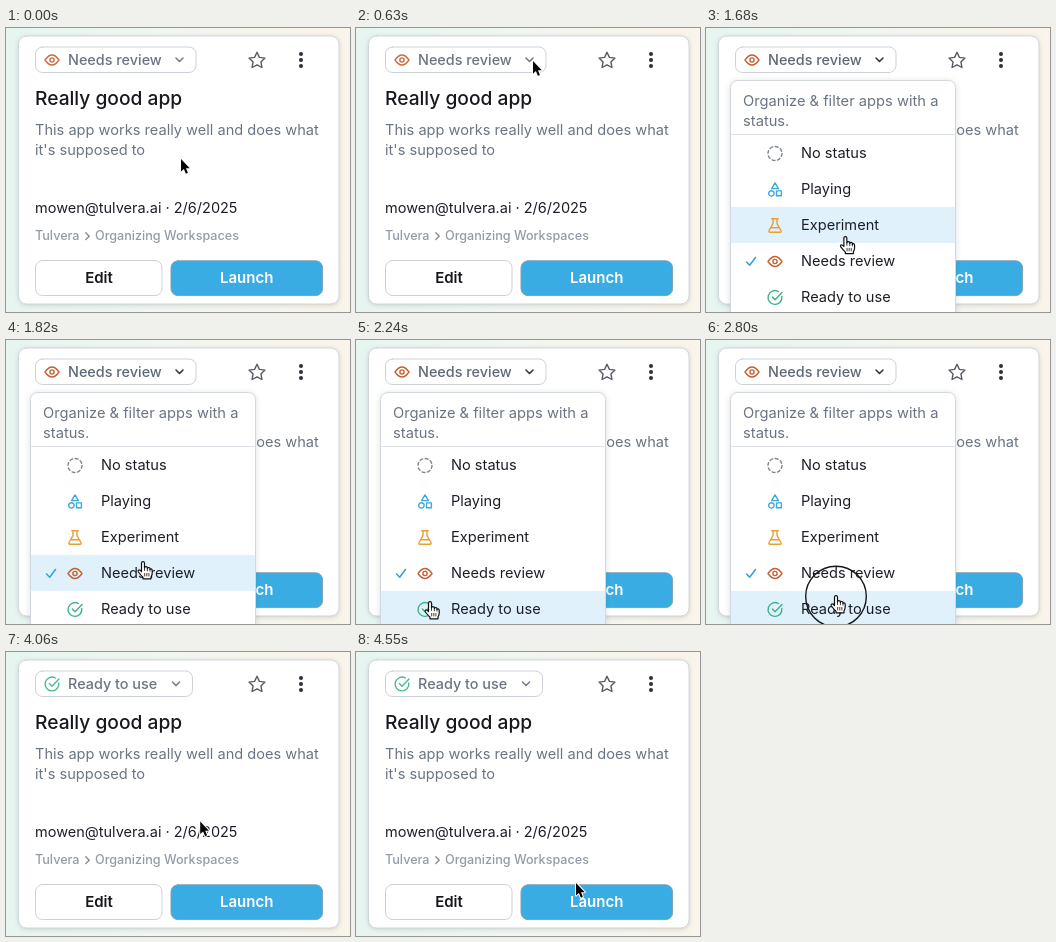
Animation, 344 px wide and 284 px high, one loop 4.62 s. Source, as an HTML page with a canvas:

```html
<!DOCTYPE html>
<html lang="en">
<head>
<meta charset="utf-8">
<title>App card status</title>
<style>
  html, body { margin: 0; width: 100%; height: 100%; overflow: hidden; background: #eef5ee; }
  canvas { display: block; width: 344px; height: 284px; }
</style>
</head>
<body>
<canvas id="stage"></canvas>
<script>
const W = 344, H = 284, LOOP = 4620, TICK = 70;
const FONT = 'Inter, "Open Sans", sans-serif';
const INK = '#1d1f27', MUTED = '#6b7482', FAINT = '#949ba7', LINE = '#ccd1d9';

const canvas = document.getElementById('stage');
const ctx = canvas.getContext('2d');
const dpr = window.devicePixelRatio || 1;
canvas.width = W * dpr;
canvas.height = H * dpr;

// Cursor moves: start time, end time, destination
const START = [175, 131];
const MOVES = [
  [140, 665, 177, 33],
  [770, 910, 172, 34],
  [980, 1050, 171, 34],
  [1280, 1820, 137, 222],
  [1820, 2240, 74, 262],
  [2590, 2800, 130, 256],
  [3360, 3710, 194, 169],
  [3990, 4550, 220, 231]
];
// Click rings: start, end, centre, radius
const CLICKS = [
  [700, 840, 176, 34, 22.3],
  [1190, 1330, 170.5, 34, 22.5],
  [2800, 3010, 130, 256.5, 30.3]
];
const OPEN = 1330, CLOSE = 3010, SWITCH = 3570;

const ROWS = [
  ['No status', 'dashed'],
  ['Playing', 'shapes'],
  ['Experiment', 'flask'],
  ['Needs review', 'eye'],
  ['Ready to use', 'done']
];
const ICONS = {
  shapes: ['#3ba7de', 'M0-6.6L3.4-.9H-3.4Z M-.9 3.9A2.7 2.7 0 1 1-6.3 3.9A2.7 2.7 0 1 1-.9 3.9Z M1.5 1.4H6.4V6.3H1.5Z'],
  flask: ['#e5a036', 'M-3.2-6.7H3.2M-2-6.7V-1.8L-6 5Q-6.6 6.7-5 6.7H5Q6.6 6.7 6 5L2-1.8V-6.7M-4.3 2.2H4.3'],
  eye: ['#c65d2e', 'M-7 0Q0-10 7 0Q0 10-7 0Z M2.1 0A2.1 2.1 0 1 1-2.1 0A2.1 2.1 0 1 1 2.1 0Z'],
  done: ['#3cb487', 'M6.8-1A6.9 6.9 0 1 1 3.4-6M-2.6-.4L0 2.2L7-5']
};
const ARROW = new Path2D('M0 0V12.6L2.9 9.9L4.9 14.7L6.9 13.8L5 9.2H8.8Z');
const HAND = new Path2D('M-1.5 9.5V1.2Q-1.5-.3 0-.3T1.5 1.2V6Q1.6 4.7 3 4.7T4.4 6V6.6Q4.6 5.4 5.8 5.5T7 7V7.6' +
  'Q7.3 6.6 8.2 6.8T9.2 8.4V11Q9.2 13 8 14.8V16.8H0V15.2Q-2 13.5-4.6 10Q-5.4 8.6-4.4 8Q-3.2 7.5-1.5 9.5Z');
const FINGERS = new Path2D('M1.5 6V8.5M4.4 6.6V8.8M7 7.6V9.2M1.7 11.4V14M3.8 11.4V14M5.9 11.4V14');

const clamp = v => Math.max(0, Math.min(1, v));
const ease = p => p < .5 ? 4 * p ** 3 : 1 - 4 * (1 - p) ** 3;

function cursorAt(t) {
  let [x, y] = START;
  for (const [from, to, tx, ty] of MOVES) {
    const p = ease(clamp((t - from) / (to - from)));
    x += (tx - x) * p;
    y += (ty - y) * p;
  }
  return [x, y];
}

function menuAlpha(t) {
  if (t < OPEN || t >= CLOSE + 2 * TICK) return 0;
  if (t < OPEN + TICK) return .7;
  return t < CLOSE ? 1 : t < CLOSE + TICK ? .65 : .25;
}

function text(str, x, y, size, weight, color, align = 'left') {
  ctx.font = `${weight} ${size}px ${FONT}`;
  ctx.textAlign = align;
  ctx.fillStyle = color;
  ctx.fillText(str, x, y);
}

function box(x, y, w, h, r, fill, stroke) {
  ctx.beginPath();
  ctx.roundRect(x, y, w, h, r);
  ctx.fillStyle = fill;
  ctx.fill();
  ctx.strokeStyle = stroke;
  ctx.lineWidth = 1;
  ctx.stroke();
}

function shadowBox(blur, alpha, ...args) {
  ctx.save();
  ctx.shadowColor = `rgba(30, 45, 60, ${alpha})`;
  ctx.shadowBlur = blur * dpr;
  ctx.shadowOffsetY = dpr;
  ctx.beginPath();
  ctx.roundRect(...args.slice(0, 5));
  ctx.fillStyle = '#fff';
  ctx.fill();
  ctx.restore();
  box(...args);
}

function line(color, width, ...pts) {
  ctx.beginPath();
  for (let i = 0; i < pts.length; i += 2) ctx.lineTo(pts[i], pts[i + 1]);
  ctx.strokeStyle = color;
  ctx.lineWidth = width;
  ctx.stroke();
}

function disc(x, y, r) {
  ctx.beginPath();
  ctx.arc(x, y, r, 0, 7);
}

function icon(name, x, y) {
  ctx.save();
  ctx.translate(x, y);
  ctx.lineWidth = 1.4;
  if (name === 'dashed') {
    ctx.strokeStyle = '#7d8490';
    ctx.setLineDash([2.9, 2.6]);
    ctx.beginPath();
    ctx.arc(0, 0, 7, 0, Math.PI * 2);
    ctx.stroke();
  } else {
    ctx.strokeStyle = ICONS[name][0];
    ctx.stroke(new Path2D(ICONS[name][1]));
  }
  ctx.restore();
}

function star(x, y) {
  ctx.beginPath();
  for (let i = 0; i < 10; i++) {
    const r = i % 2 ? 4.1 : 8.4, a = i * Math.PI / 5 - Math.PI / 2;
    ctx.lineTo(x + r * Math.cos(a), y + .7 + r * Math.sin(a));
  }
  ctx.closePath();
  ctx.strokeStyle = '#565b65';
  ctx.lineWidth = 1.4;
  ctx.stroke();
}

function drawStatus(t) {
  const ready = t >= SWITCH;
  const active = t < CLOSE ? clamp((t - 770) / 140) : 0;
  const right = ready ? 186.5 : 190;
  const cx = right - 16.5;
  box(29.5, 19, right - 29.5, 25.5, 7, '#fff', LINE);
  ctx.globalAlpha = .92 + .08 * active;
  icon(ready ? 'done' : 'eye', 46, 32);
  text(ready ? 'Ready to use' : 'Needs review', 62, 36.7, 14.4, 500, '#5f6877');
  line(active > .5 ? '#343841' : '#6b7280', 1.6, cx - 3.5, 30, cx, 33.5, cx + 3.5, 30);
  ctx.globalAlpha = 1;
}

function drawCard(t) {
  const bg = ctx.createLinearGradient(0, 0, W, 0);
  bg.addColorStop(0, '#e6f5f0');
  bg.addColorStop(.5, '#f2f6f0');
  bg.addColorStop(1, '#faf4ea');
  ctx.fillStyle = bg;
  ctx.fillRect(0, 0, W, H);
  shadowBox(5, .2, 12.5, 8, 320.5, 268, 8, '#fff', '#d1d6da');

  drawStatus(t);
  star(251, 32);
  ctx.fillStyle = '#2c2f37';
  for (const y of [26, 32, 38]) {
    disc(295, y, 2);
    ctx.fill();
  }

  text('Really good app', 29, 76.5, 19.2, 500, '#17181d');
  text('This app works really well and does what', 29, 107, 14.6, 400, MUTED);
  text("it's supposed to", 29, 127, 14.6, 400, MUTED);
  text('mowen@tulvera.ai · 2/6/2025', 29, 185, 14.5, 400, INK);
  text('Tulvera', 29, 212, 12.6, 500, FAINT);
  line('#858d99', 1.4, 79.8, 204.8, 83.2, 208.2, 79.8, 211.6);
  text('Organizing Workspaces', 89, 212, 12.6, 500, FAINT);

  box(29.5, 232.5, 126.5, 35, 7, '#fff', LINE);
  text('Edit', 93, 255, 15, 600, '#15161b', 'center');
  box(165, 232.8, 151.6, 34.8, 7, '#39ade3', '#809fb1');
  text('Launch', 240.7, 255, 15, 600, '#fff', 'center');
}

function drawMenu(alpha, pointer) {
  ctx.globalAlpha = alpha;
  shadowBox(6, .18, 24.5, 52.5, 225, 260, 7, '#fff', '#d3d8de');
  text('Organize & filter apps with a', 37, 77.5, 14.7, 400, MUTED);
  text('status.', 37, 97.5, 14.7, 400, MUTED);
  line('#dfe3e8', 1, 25, 106.5, 249, 106.5);
  const hover = Math.floor((pointer[1] - 107) / 36);
  ROWS.forEach(([label, name], i) => {
    const y = 125 + i * 36;
    if (i === hover) {
      ctx.fillStyle = '#e0f1fc';
      ctx.fillRect(25, y - 18, 224, 36);
    }
    icon(name, 69, y + .5);
    text(label, 95, y + 5.3, 14.6, 400, INK);
  });
  line('#38a3da', 1.6, 40.5, 234, 43.7, 237.2, 49.5, 229.5);
  ctx.globalAlpha = 1;
}

function drawPointer([x, y], menuOpen) {
  const hand = y > (menuOpen ? 107 : 233);
  ctx.save();
  ctx.translate(x, y);
  if (hand) {
    ctx.fillStyle = '#fff';
    ctx.fill(HAND);
    ctx.strokeStyle = '#111';
    ctx.lineWidth = 1.2;
    ctx.stroke(HAND);
    ctx.lineWidth = .8;
    ctx.stroke(FINGERS);
  } else {
    ctx.strokeStyle = '#fff';
    ctx.lineWidth = 2;
    ctx.stroke(ARROW);
    ctx.fillStyle = '#050505';
    ctx.fill(ARROW);
  }
  ctx.restore();
}

function draw(t) {
  const pointer = cursorAt(t), alpha = menuAlpha(t);
  ctx.setTransform(dpr, 0, 0, dpr, 0, 0);
  ctx.lineCap = ctx.lineJoin = 'round';
  drawCard(t);
  if (alpha) drawMenu(alpha, pointer);
  for (const [from, to, x, y, r] of CLICKS) {
    if (t < from || t >= to) continue;
    disc(x, y, r);
    ctx.strokeStyle = '#15171b';
    ctx.lineWidth = 1.4;
    ctx.stroke();
  }
  drawPointer(pointer, alpha > 0);
}

const begin = performance.now();
function loop() {
  const t = (performance.now() - begin) % LOOP;
  draw(Math.floor(t / TICK) * TICK);
  requestAnimationFrame(loop);
}
loop();
</script>
</body>
</html>
```
